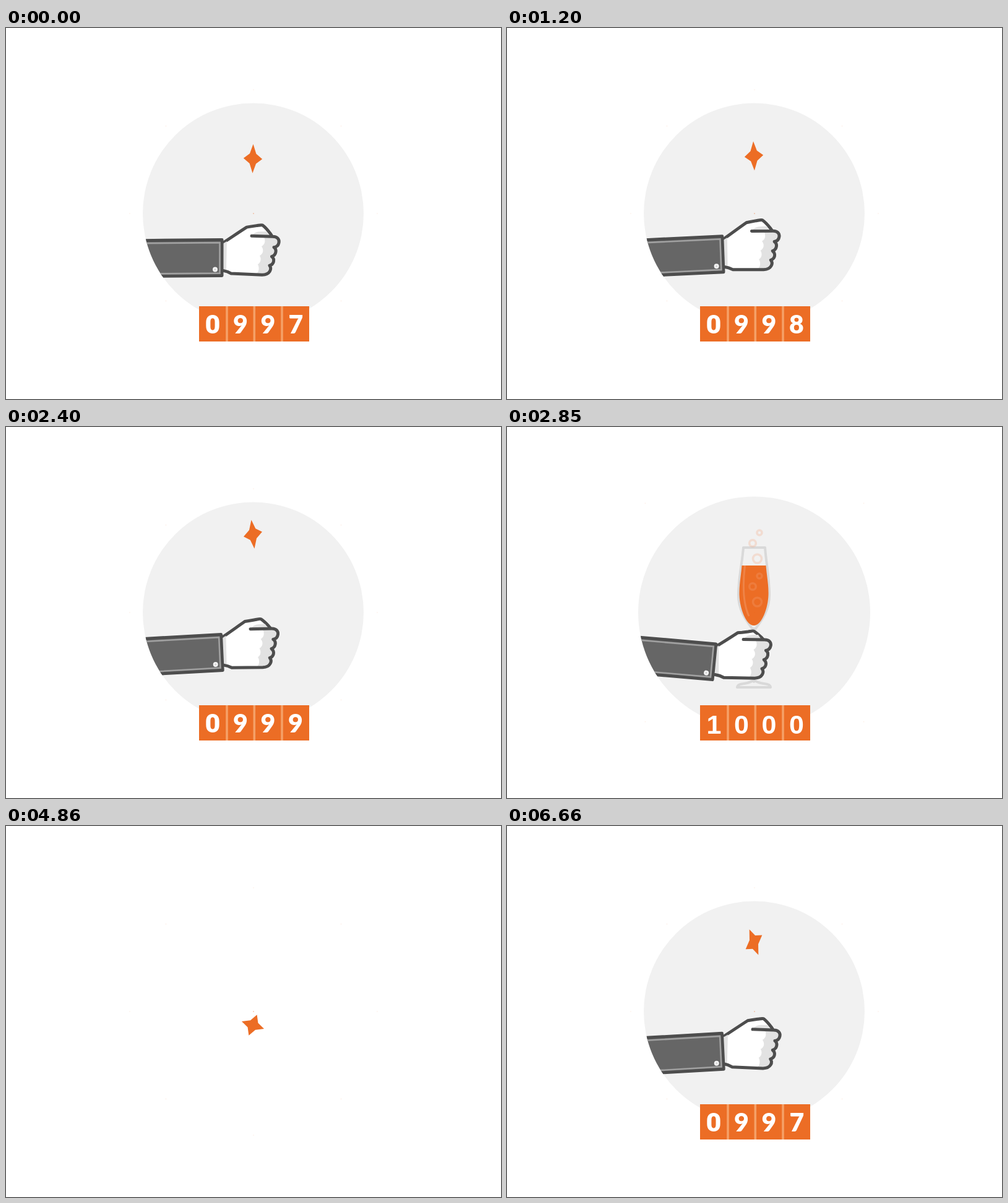
An HTML page without scripts that plays this animation: 800x600 px, repeating every 6.69 s.

```html
<!DOCTYPE html>
<html lang="en">
<head>
<meta charset="utf-8">
<title>Counting to 1000</title>
<style>
  html, body { margin: 0; width: 100%; height: 100%; overflow: hidden; background: #fff; }
  svg { position: absolute; left: 0; top: 0; width: 800px; height: 600px; }

  /* the cycle starts at a star launch, 71 ms after page load */
  .m { animation: 6690ms linear -6619ms infinite; }

  .disc {
    position: absolute; left: 0; top: 0; width: 800px; height: 600px;
    background: #f1f1f1; clip-path: circle(178.5px at 399.5px 300px);
    animation-name: disc;
  }
  .line { fill: none; stroke: #4d4d4d; stroke-width: 5; stroke-linejoin: round; stroke-linecap: round; }
  .seam { fill: none; stroke: #a0a0a0; stroke-width: 2.6; }
  .shade { fill: #e2e2e2; }
  .glassline { fill: none; stroke: #d9d9d9; stroke-width: 4; stroke-linejoin: round; stroke-linecap: round; }
  .hot { fill: #ec6d25; }
  .rays { fill: none; stroke: #ec6d25; stroke-linecap: round; }

  .arm { transform-origin: 200px 372px; animation-name: arm; }
  .hand { transform-origin: 352px 372px; animation-name: hand; }
  .thumb { animation-name: thumb; }
  .fold { animation-name: fold; }
  .glass { transform-origin: 399px 365px; animation-name: glassUp, glassPop; }
  .bubbles { fill: none; stroke: #f4a47c; stroke-width: 3.5; animation-name: bubbles; }
  .sparks { animation-name: sparks; }
  .burst { transform-origin: 400px 300px; animation-name: burst, burstSize; }
  .star { animation-name: starY, squash; }
  .spin { animation-name: spin; }
  .counter { animation-name: counter; }
  .units { animation-name: units; }
  .carry { animation-name: carry; }

  text { fill: #fff; text-anchor: middle; font: 900 41px Lato, sans-serif; }
  .r { font: 900 43px Roboto, sans-serif; }
  .k { font: 700 43px "Liberation Sans", Arial, sans-serif; }

  @keyframes disc {
    0%, 36.23%, 83.1%, 100% { clip-path: circle(178.5px at 399.5px 300px); }
    37.6% { clip-path: circle(194px at 399.5px 300px); }
    39.5% { clip-path: circle(186px at 399.5px 300px); }
    41% { clip-path: circle(187.5px at 399.5px 300px); }
    51.85% { clip-path: circle(187.5px at 399.5px 300px); animation-timing-function: ease-in; }
    56.8%, 80.7% { clip-path: circle(0px at 399.5px 300px); }
  }

  @keyframes starY {
    0%, 18%, 81.8% { translate: 399px 280px; animation-timing-function: cubic-bezier(.28,1,.55,1); }
    9%, 90.87% { translate: 399px 87px; animation-timing-function: cubic-bezier(.45,0,.72,0); }
    27.26% { translate: 399px 48.5px; animation-timing-function: cubic-bezier(.45,0,.72,0); }
    36.23% { translate: 399px 280px; }
    62%, 68.2% { translate: 399px 301px; animation-timing-function: ease-in-out; }
    71%, 71.8% { translate: 399px 322px; animation-timing-function: ease-out; }
    74.7%, 78.3% { translate: 399px -40px; animation-timing-function: ease-in; }
    100% { translate: 399px 280px; }
  }
  @keyframes squash {
    0%, 3%, 15%, 21%, 33%, 36.22%, 73%, 85%, 97%, 100% { scale: .8 1.24; }
    9%, 27%, 65.3%, 68.2%, 90.87% { scale: 1 1; }
    36.23%, 62.63% { scale: 0 0; }
    64.5% { scale: 1.1 1.1; }
    71% { scale: 1.1 .8; }
  }
  @keyframes spin {
    0% { rotate: 0deg; animation-timing-function: cubic-bezier(.29,1,.6,1); }
    9% { rotate: 270deg; animation-timing-function: cubic-bezier(.38,0,.69,0); }
    18% { rotate: 540deg; animation-timing-function: cubic-bezier(.29,1,.6,1); }
    27.26% { rotate: 845deg; animation-timing-function: cubic-bezier(.38,0,.69,0); }
    36.23% { rotate: 1080deg; }
    62%, 71% { rotate: 0deg; }
    81.73% { rotate: 360deg; animation-timing-function: cubic-bezier(.29,1,.6,1); }
    90.87% { rotate: 630deg; animation-timing-function: cubic-bezier(.38,0,.69,0); }
    100% { rotate: 900deg; }
  }

  @keyframes arm {
    0%, 18%, 81.73%, 100% { rotate: 3deg; translate: 0 0; }
    1.5%, 19.5%, 83.24% { rotate: -.8deg; }
    3%, 21%, 84.7% { rotate: -3deg; }
    9%, 13%, 26.74%, 31%, 90%, 94% { rotate: 1.45deg; }
    16.2%, 98.49% { rotate: -2.9deg; }
    16.87% { rotate: -2.3deg; }
    98.94% { rotate: 0deg; }
    35% { rotate: -2.9deg; translate: 0 0; }
    36.6% { rotate: 7deg; translate: -13.5px -6px; }
    38%, 41.5% { rotate: 5.5deg; translate: -13.5px -6px; }
    55%, 60% { rotate: 4deg; translate: -13.5px -8.5px; }
    70% { rotate: 3deg; translate: 0 0; }
  }
  @keyframes hand {
    0%, 16%, 18%, 35%, 81.73%, 98.94%, 100% { rotate: 0deg; translate: 0 0; }
    1.5%, 19.5%, 83.24% { rotate: 3.7deg; translate: -2.5px 0; }
    9%, 12%, 26%, 30%, 89%, 94% { rotate: 0deg; translate: -2px 0; }
    36.6%, 41.5% { rotate: -6.7deg; translate: 0 0; }
    55%, 60% { rotate: -5.2deg; translate: 0 0; }
    97%, 98.49% { rotate: 3.2deg; translate: 0 0; }
  }
  @keyframes thumb {
    0%, 15%, 18%, 33%, 81.73%, 97%, 100% { d: path("M352 346.5C362 340 375 331 389 322L395 321L405 319.5C409 319 414 318 415 319C419 322 424 328 427 332L430 336.5"); }
    37%, 60% { d: path("M352 346.5C362 341 375 333 388 325L395 324.5L405 323.5C409 323 413 322 414.5 323C419 326 423 330 426 333L429 336.5"); }
    1%, 1.7%, 19%, 19.7%, 82.7%, 83.4% { d: path("M352 346.5C358 343 360 341 362 338L382 314L380.5 297C380.5 291 393 289.5 396 294C398 299 401.5 312 400.5 318L398.5 335"); }
    5%, 12%, 23%, 30%, 87%, 94% { d: path("M352 346.5C358 343 360 341 362 338L383 315.5L385.5 298C386 292 398 291 401 295C403 300 406 313 404 318L400.5 335"); }
  }
  @keyframes fold {
    0%, 15%, 18%, 33%, 81.73%, 97%, 100% { d: path("M398 335Q402 329 412 329L421 329L425 335L398 335Z"); }
    1%, 1.7%, 19%, 19.7%, 82.7%, 83.4% { d: path("M381 337Q394 327 394 314L394 299L399 315L398 337Z"); }
    5%, 12%, 23%, 30%, 87%, 94% { d: path("M384 337Q397 327 398 314L399 299L403 315L400 337Z"); }
  }

  @keyframes glassUp {
    0%, 41.5% { translate: 0 0; }
    55%, 100% { translate: 0 -5.7px; }
  }
  @keyframes glassPop {
    0%, 36.23% { scale: 0; animation-timing-function: ease-out; }
    38%  { scale: 1.06; }
    39.5%, 60% { scale: 1; }
    60.1%, 100% { scale: 0; }
  }
  @keyframes bubbles {
    0%, 36.5% { translate: 0 50px; opacity: 0; }
    38% { translate: 0 35px; opacity: .8; }
    41.54% { translate: 0 0; opacity: .28; }
    44%, 100% { translate: 0 -16px; opacity: 0; }
  }

  @keyframes sparks {
    0%, 12%, 18%, 36%, 81.73%, 95.1%, 100% { stroke-dasharray: 0 99; stroke-dashoffset: 0; stroke-width: .5; }
    .4%, 18.4%, 82.1% { stroke-width: 4; }
    1.5%, 19.5%, 83.24% { stroke-dasharray: 18 99; stroke-dashoffset: 0; stroke-width: 4; }
    4.2%, 22.2%, 85.9% { stroke-width: 4; }
    4.5%, 11.9%, 22.5%, 35%, 86.2%, 95% { stroke-dasharray: 0 99; stroke-dashoffset: -36; stroke-width: .5; }
  }
  @keyframes burst {
    0%, 36.23%, 43.1%, 60%, 100% { stroke-dasharray: 0 99; stroke-dashoffset: 0; stroke-width: .3; }
    36.6%, 43.5% { stroke-width: 4; }
    38% { stroke-dasharray: 40 99; stroke-dashoffset: 0; stroke-width: 4; }
    39.5% { stroke-dasharray: 12 99; stroke-dashoffset: -38; stroke-width: 4; }
    40.6%, 43% { stroke-dasharray: 0 99; stroke-dashoffset: -50; stroke-width: .3; }
    45.5% { stroke-dasharray: 30 99; stroke-dashoffset: 0; stroke-width: 4; }
    47.5%, 59% { stroke-dasharray: 0 99; stroke-dashoffset: -38; stroke-width: 0; }
  }
  @keyframes burstSize {
    0%, 36%, 41.2%, 100% { scale: 1; }
    37%, 40% { scale: 1.05; }
  }

  @keyframes counter {
    0%, 85.05%, 100% { translate: 0 0; }
    51.4% { translate: 0 0; animation-timing-function: ease-in; }
    55.3%, 80.25% { translate: 0 156.5px; }
    81.9% { translate: 0 46px; animation-timing-function: ease-out; }
    83.24% { translate: 0 -12px; animation-timing-function: ease-in-out; }
  }
  @keyframes units {
    0%, 1.2%, 87%, 100% { translate: 0 -57px; animation-timing-function: ease-in-out; }
    5.2%, 19.2% { translate: 0 -114px; animation-timing-function: ease-in-out; }
    23.2%, 37.2% { translate: 0 -171px; animation-timing-function: ease-in-out; }
    41%, 60% { translate: 0 -228px; }
    60.1%, 82.3% { translate: 0 0; animation-timing-function: ease-in-out; }
  }
  @keyframes carry {
    0%, 37.2% { translate: 0 0; animation-timing-function: ease-in-out; }
    41%, 60% { translate: 0 -57px; }
    60.1%, 100% { translate: 0 0; }
  }
</style>
</head>
<body>
<div class="disc m">
  <svg viewBox="0 0 800 600">
    <defs>
      <path id="palm" d="M397 336L431 337C439 337 442 342 441 347C440 352 437 354 433 354.5C438 358 437 367 429.5 369.5C435 374 433 382 426 384C430 389 427 399 414 399L364 397C359 394 356 393 350 392"/>
    </defs>

    <g class="glass m">
      <path class="glassline" d="M382 195H417C419 222 424 244 424 272C424 296 412 312 399 330C386 312 374 296 374 272C374 244 380 222 382 195ZM399 326V412M372 421H426C425 413 411 417 402 411H396C387 417 373 413 372 421Z"/>
      <path class="hot" d="M379.5 224H418.5C420 242 423 255 422.5 272C422 292 412 321 399 321C386 321 376 292 375.5 272C375 255 378 242 379.5 224Z"/>
      <path d="M384.5 224C382 245 379 280 391 306" fill="none" stroke="#fff" stroke-opacity=".15" stroke-width="3"/>
      <g class="bubbles m">
        <circle cx="408" cy="171" r="4"/><circle cx="397" cy="188" r="5.3"/><circle cx="404.5" cy="213" r="7"/>
        <circle cx="408" cy="241" r="4"/><circle cx="397" cy="258" r="5.3"/><circle cx="404.5" cy="283" r="7"/>
      </g>
    </g>

    <g class="arm m">
      <g class="hand m">
        <path fill="#fff" d="M350 346L400 335V390L364 396L350 392Z"/>
        <path class="thumb line m" style="fill:#fff" d="M352 346.5C362 340 375 331 389 322L395 321L405 319.5C409 319 414 318 415 319C419 322 424 328 427 332L430 336.5"/>
        <path class="fold shade m" d="M398 335Q402 329 412 329L421 329L425 335L398 335Z"/>
        <use href="#palm" fill="#fff"/>
        <path class="shade" d="M417 338C420 345 418 350 413 353C417 358 416 365 410 368C413 373 412 379 407 382C410 388 409 394 404 398L414 399C427 399 430 389 426 384C433 382 435 374 429.5 369.5C437 367 438 358 433 354.5C440 352 441 347 441 345C440 339 436 337 431 337Z"/>
        <path class="shade" d="M350 349L357 345L356 392H350Z"/>
        <use href="#palm" class="line"/>
      </g>
      <path class="line" style="fill:#666" d="M120 344.5L349 342.5V400.5L120 402.5Z"/>
      <path class="seam" d="M120 349L345.5 347V396.5L120 398.5"/>
      <circle cx="338" cy="390.5" r="4" fill="#f4f4f4"/>
      <circle cx="338" cy="390.5" r="1.5" fill="#d4d4d4"/>
    </g>
  </svg>
</div>

<svg viewBox="0 0 800 600">
  <defs>
    <clipPath id="cells"><path d="M312 450h178v57H312Z"/></clipPath>
  </defs>

  <path class="rays burst m" d="M600 300h50M400 500v50M200 300h-50M400 100v-50M541.4 441.4l35.4 35.4M258.6 441.4l-35.4 35.4M258.6 158.6l-35.4-35.4M541.4 158.6l35.4-35.4"/>

  <g class="counter m">
    <path class="hot" d="M312 450h178v57H312Z"/>
    <path d="M357 450v57M401.3 450v57M446 450v57" stroke="#f5a067" stroke-width="3.6"/>
    <g clip-path="url(#cells)">
      <g class="carry m">
        <text class="r" x="334" y="493.5">0</text>
        <text x="379" y="494">9</text>
        <text x="423.5" y="494">9</text>
        <text class="k" x="334.5" y="553">1</text>
        <text class="k" x="379" y="553">0</text>
        <text class="k" x="423.5" y="553">0</text>
      </g>
      <g class="units m">
        <text x="468" y="494">6</text>
        <text x="468.5" y="551">7</text>
        <text x="468" y="608">8</text>
        <text x="468" y="665">9</text>
        <text class="k" x="468" y="724">0</text>
      </g>
    </g>
  </g>

  <path class="rays sparks m" d="M400 300v-36M400 300l31-18M400 300l-31-18"/>

  <g class="star m">
    <path class="hot spin m" d="M0-19L6.5-6.5L19 0L6.5 6.5L0 19L-6.5 6.5L-19 0L-6.5-6.5Z"/>
  </g>
</svg>
</body>
</html>
```
